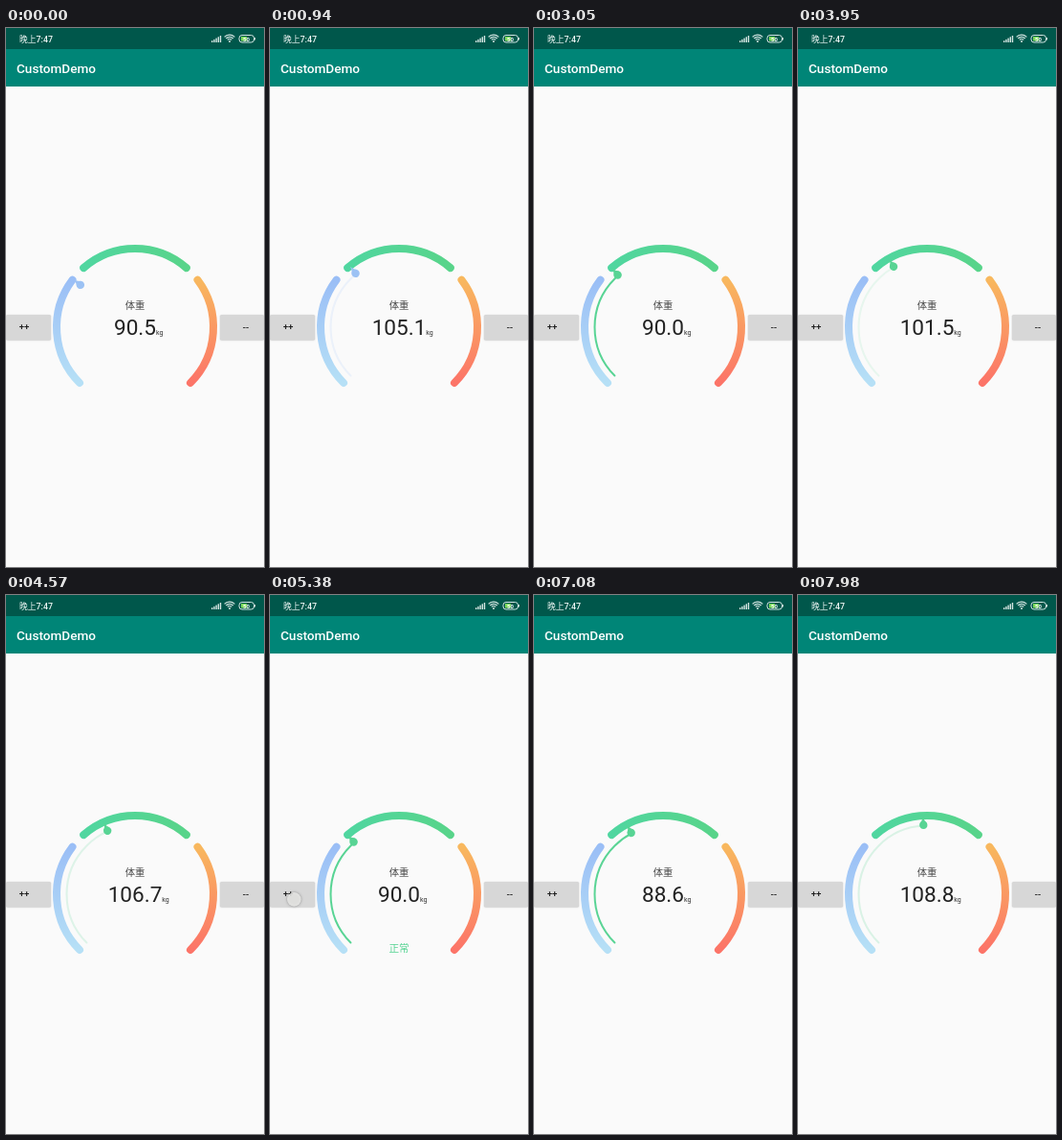
Write an HTML page with a canvas that moves like this. It is 270 px wide and 562 px high and loops after 8 s.

```html
<!DOCTYPE html>
<html lang="zh">
<head>
<meta charset="utf-8">
<style>
html, body { margin: 0; width: 100%; height: 100%; overflow: hidden; background: #fafafa; }
canvas { display: block; width: 100%; height: 100%; }
</style>
</head>
<body>
<canvas id="stage"></canvas>
<script>
const W = 270, H = 562, LOOP = 8000, CX = 135, CY = 312;
const START = 135, WEIGHT = 90, RETURN = 0.08, RISE = 0.42, END = 3.38;
const FONT = 'Roboto, "Noto Sans CJK SC", "Noto Sans CJK", sans-serif';
const BLUE = '#9cc2f4', GREEN = '#58d494';

// Each run: press time in seconds, sweep in degrees, colour, verdict.
const runs = [
  { at: -1.88, sweep: 82.2, color: BLUE, label: '偏低' },
  { at: 1.81, sweep: 94, color: GREEN, label: '正常' },
  { at: 5.38, sweep: 109.2, color: GREEN, label: '正常' }
];
// Swing of the needle: time since press, progress, slope.
const swing = [
  [RISE, 0, 2.6], [0.96, 0.8952, 0.7], [1.24, 1, 0.1], [1.88, 1.0055, 0.25],
  [2.14, 1.1275, 0.45], [2.6, 1.209, 0], [END, 1, 0]
];

const canvas = document.getElementById('stage');
const c = canvas.getContext('2d');
const scale = window.devicePixelRatio || 1;
canvas.width = W * scale;
canvas.height = H * scale;

const rad = deg => deg * Math.PI / 180;

function progress(t) {
  if (t >= END) return 1;
  const i = swing.findIndex(k => k[0] > t);
  if (i < 1) return 0;
  const [t0, v0, m0] = swing[i - 1], [t1, v1, m1] = swing[i];
  const h = t1 - t0, u = (t - t0) / h, w = 1 - u;
  return w * w * ((1 + 2 * u) * v0 + u * h * m0) + u * u * ((3 - 2 * u) * v1 - w * h * m1);
}

function rect(x, y, w, h, color) {
  c.fillStyle = color;
  c.fillRect(x, y, w, h);
}

function disc(x, y, r, color) {
  c.fillStyle = color;
  c.beginPath();
  c.arc(x, y, r, 0, 7);
  c.fill();
}

function text(str, x, y, size, color, align = 'center', weight = 400) {
  c.font = `${weight} ${size}px ${FONT}`;
  c.textAlign = align;
  c.fillStyle = color;
  c.fillText(str, x, y);
  return c.measureText(str).width;
}

function arc(r, from, to, width, color) {
  c.strokeStyle = color;
  c.lineWidth = width;
  c.lineCap = 'round';
  c.beginPath();
  c.arc(CX, CY, r, rad(from), rad(to));
  c.stroke();
}

function gradient(x0, y0, x1, y1, a, b) {
  const g = c.createLinearGradient(x0, y0, x1, y1);
  g.addColorStop(0, a);
  g.addColorStop(1, b);
  return g;
}

function bars() {
  const pale = '#d4e4e1';
  rect(0, 0, W, H, '#fafafa');
  rect(0, 0, W, 61, '#008577');
  rect(0, 0, W, 22, '#00574b');
  text('晚上7:47', 14, 14.5, 8.8, '#eef5f3', 'left', 500);
  text('CustomDemo', 11, 47, 13.6, '#fff', 'left', 500);
  for (let i = 0; i < 5; i++) rect(215 + i * 2.2, 13.2 - i * 1.3, 1.4, 1.8 + i * 1.3, pale);
  c.strokeStyle = pale;
  c.lineWidth = 1.2;
  c.lineCap = 'butt';
  for (const r of [3, 5.2, 7.4]) {
    c.beginPath();
    c.arc(234, 14.5, r, rad(223), rad(317));
    c.stroke();
  }
  disc(234, 14, 1, pale);
  c.lineWidth = 1;
  c.beginPath();
  c.roundRect(244, 7.5, 15.5, 7.5, 3);
  c.stroke();
  rect(246, 9, 6, 4.5, '#7ad85a');
  rect(260, 10, 1, 2.5, pale);
  text('50', 251.5, 13.5, 6, '#fff', 'center', 700);
}

function button(x, w, str, tx, press) {
  c.save();
  c.shadowColor = `rgba(0,0,0,${0.25 + 0.25 * press})`;
  c.shadowBlur = (1.5 + 5 * press) * scale;
  c.shadowOffsetY = (0.5 + 2.5 * press) * scale;
  const tone = Math.round(215 - 44 * press);
  c.fillStyle = `rgb(${tone},${tone},${tone})`;
  c.beginPath();
  c.roundRect(x, 299, w, 26, 1.5);
  c.fill();
  c.restore();
  text(str, tx, 315.3, 9.6, '#1e1e1e', 'center', 500);
}

function gauge() {
  arc(82, 135, 217, 8, gradient(0, 370, 0, 262, '#b6e0f6', '#9abef6'));
  arc(82, 229, 311, 8, gradient(81, 0, 188, 0, '#50d6a0', '#58d48a'));
  arc(82, 323, 405, 8, gradient(0, 262, 0, 370, '#f8b85e', '#fc7468'));
}

function needle(angle, color) {
  c.save();
  c.translate(CX, CY);
  c.rotate(rad(angle));
  disc(72.2, 0, 4.2, color);
  c.beginPath();
  c.moveTo(81, 0);
  c.quadraticCurveTo(77, 0.8, 74, 3.6);
  c.lineTo(74, -3.6);
  c.quadraticCurveTo(77, -0.8, 81, 0);
  c.fill();
  c.restore();
}

function touch(t) {
  if (t < 0 || t > 0.22) return;
  const u = Math.min(1, t / 0.12);
  c.save();
  c.globalAlpha = Math.min(1, (0.22 - t) / 0.06) * 0.85;
  c.shadowColor = 'rgba(0,0,0,.4)';
  c.shadowBlur = 3 * scale;
  disc(25.2 + u, 317.3 + 3.7 * u, 7.3, '#ececea');
  c.restore();
}

function draw(ms) {
  const now = ms / 1000;
  let i = runs.length - 1;
  while (i > 0 && now < runs[i].at + RETURN) i--;
  const run = runs[i], t = now - run.at;
  const back = t < RISE;
  const s = progress(t);
  const sweep = back
    ? runs[Math.max(0, i - 1)].sweep * (1 - (t - RETURN) / (RISE - RETURN))
    : run.sweep * s;

  const held = now - (now < runs[2].at ? runs[1].at : runs[2].at);
  const press = held < 0 ? 0 : Math.min(1, held / 0.1) * Math.max(0, Math.min(1, (0.36 - held) / 0.2));

  c.setTransform(scale, 0, 0, scale, 0, 0);
  bars();
  button(0, 47, '++', 19, press);
  button(224, 46, '--', 251, 0);
  gauge();

  if (!back) {
    // Opacity is one byte and wraps when the needle overshoots.
    c.globalAlpha = (Math.floor(s * 255) & 255) / 255;
    arc(71.5, START, START + sweep, 2, run.color);
    c.globalAlpha = 1;
  }
  needle(START + sweep, run.color);

  text('体重', CX, 293, 10.3, '#484848');
  const width = text(back ? '--' : (WEIGHT * s).toFixed(1), CX, 320, 22.6, '#222');
  text('kg', CX + width / 2, 320.3, 7, '#333', 'left');
  if (t >= END) text(run.label, CX, 372, 10.6, run.color);
  touch(held);
}

const begin = performance.now();
function frame() {
  draw((performance.now() - begin) % LOOP);
  requestAnimationFrame(frame);
}
frame();
</script>
</body>
</html>
```
